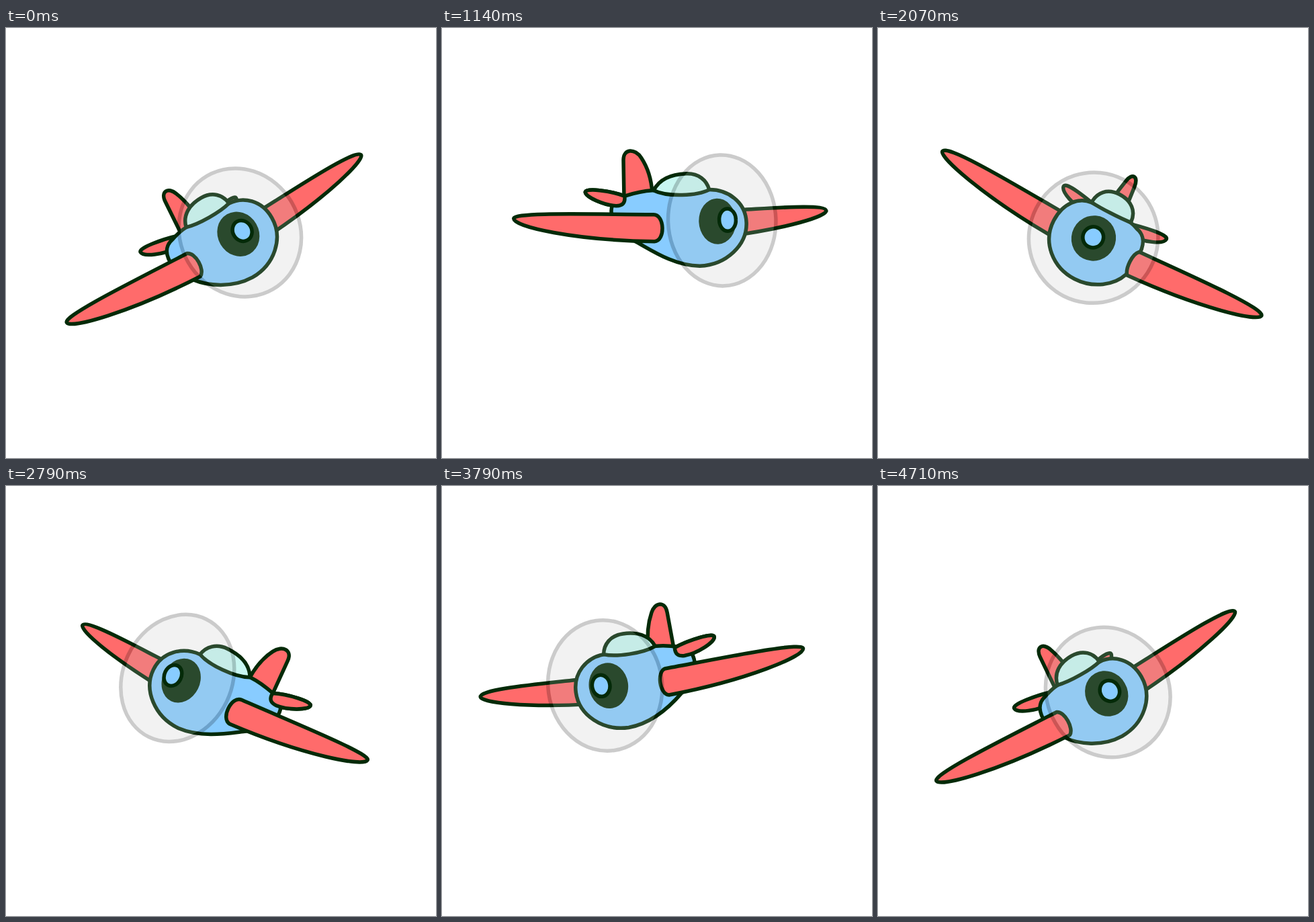
Recreate the animation shown at these times as an HTML page. Size 640 by 640 pixels, loop 4.78 s.

```html
<!DOCTYPE html>
<html>
<head>
<meta charset="utf-8">
<style>
  html, body { margin: 0; height: 100%; overflow: hidden; background: #fff; }
  svg { display: block; width: 100%; height: 100%; }
  path { stroke: #042a08; stroke-width: 5.5; stroke-linejoin: round; }
</style>
</head>
<body>
<svg viewBox="0 0 640 640"><g id="plane"></g></svg>
<script>
const PERIOD = 4780;
const DARK = '#042a08', RED = '#ff6b6b', BLUE = '#88ccff', GLASS = '#c8f7f1';
const plane = document.getElementById('plane');

const ellipse = (cx, cy, rx, ry) =>
  `M${cx - rx} ${cy} a${rx} ${ry} 0 1 0 ${2 * rx} 0 a${rx} ${ry} 0 1 0 ${-2 * rx} 0 Z`;

// Each part has two poses, seen from the front and turned right, with the hub at 0,0.
const parts = [];
function part(fill, front, side) {
  const el = document.createElementNS('http://www.w3.org/2000/svg', 'path');
  el.setAttribute('fill', fill);
  plane.append(el);
  const numbers = side.match(/-?[\d.]+/g).map(Number);
  parts.push({ el, front, numbers });
  return el;
}

// far wing
part(RED,
  'M67 -12 C145 -16 271 -24 269 -10 C269 -1 185 21 67 27 Z',
  'M0 -14 C50 -14 144 -20 144.5 -8 C144 0 90 15 0 24 Z');
// far elevator
part(RED,
  'M20 -41 C50 -48 87 -55 87 -47.5 C87 -38 60 -28 32 -27 C25 -28 20 -31 20 -41 Z',
  'M-110 -38 C-95 -46 -61 -53 -61 -46 C-61 -40 -80 -30 -100 -28 C-105 -28 -110 -31 -110 -38 Z');
// rudder
part(RED,
  'M-13 -38 L-7 -95 C-5 -112 5 -112 7 -97 C9 -86 12 -65 13 -43 Z',
  'M-156 -38 L-155 -94 C-155 -112 -137 -112 -128 -97 C-120 -84 -114 -65 -113.5 -45 Z');
const nearElevator = [
  'M-20 -41 C-50 -48 -87 -55 -87 -47.5 C-87 -38 -60 -28 -32 -27 C-25 -28 -20 -31 -20 -41 Z',
  'M-155 -41 C-175 -50 -213 -56 -213 -49 C-213 -42 -185 -28 -168 -27 C-158 -27 -154 -31 -155 -41 Z'];
part(RED, ...nearElevator);
// body
part(BLUE,
  'M-33 -44.5 C-15 -45 15 -45 31 -44.5 C50 -43 67 -25 67 5 C67 42 36 68 0 68 C-30 68 -55 50 -62 27 ' +
  'C-65 15 -64 -7 -62 -18 C-60 -30 -53 -39 -42 -41 C-38 -43 -36 -44 -33 -44.5 Z',
  'M-112 -48 C-85 -52 -50 -50 -27 -46 C2 -45 27 -25 27 5 C27 38 -5 67 -45 67 C-85 65 -120 38 -140 27 ' +
  'C-162 12 -176 -5 -175 -20 C-174 -33 -166 -39 -155 -41 C-140 -45 -125 -48 -112 -48 Z');
// canopy
part(GLASS,
  'M-33 -45 C-33 -64 -20 -75 0 -75 C20 -75 31 -62 31 -45 C15 -44 -15 -44 -33 -45 Z',
  'M-110 -48 C-100 -66 -80 -71 -60 -71 C-42 -71 -30 -60 -27 -46 C-45 -37 -90 -37 -110 -48 Z');
const elevatorOnTop = part(RED, ...nearElevator);
// nose
part(DARK, ellipse(0, 1, 33.5, 34), ellipse(-15.5, 1.5, 27.5, 34)).style.stroke = 'none';
// near wing
part(RED,
  'M-67 -12 C-145 -16 -274 -24 -272 -11 C-272 -1 -185 21 -67 27 C-61 18 -60 -4 -67 -12 Z',
  'M-111 -12 C-200 -15.5 -321 -24 -319 -13.5 C-319 -2 -232 22 -111 28 C-94 28 -94 -12 -111 -12 Z');
// propeller disc
const disc = part('#c3c3c3', ellipse(0, 0.5, 97.5, 97.5), ellipse(-8.5, 0.5, 79.8, 97.5));
disc.style.stroke = '#000';
disc.style.opacity = 0.2;
// hub
part(BLUE, ellipse(0, 0, 15.6, 15.6), ellipse(0, 0, 12.3, 16.2));

function draw(now) {
  const angle = now % PERIOD / PERIOD * 2 * Math.PI;
  const sin = n => Math.sin(n * angle), cos = n => Math.cos(n * angle);

  const x = 320 + 94.7 * sin(1) + 36 * cos(1) - 7.2 * sin(3) - 4.5 * cos(3);
  const y = 294 + 7 * cos(2) - 17.2 * sin(2) + cos(4);
  const roll = -30 * cos(1);
  const yaw = 0.93 * sin(1) + 0.53 * cos(1) - 0.055 * cos(3);
  const turn = Math.abs(yaw);

  plane.setAttribute('transform',
    `translate(${x} ${y}) rotate(${roll}) scale(${yaw < 0 ? -1 : 1} 1)`);
  for (const { el, front, numbers } of parts) {
    let i = 0;
    // Rounding back to a number keeps the arc flags valid.
    el.setAttribute('d', front.replace(/-?[\d.]+/g,
      n => +(+n + (numbers[i++] - n) * turn).toFixed(2)));
  }
  elevatorOnTop.style.display = turn > 0.6 ? '' : 'none';
}

const start = performance.now();
function tick() {
  draw(performance.now() - start);
  requestAnimationFrame(tick);
}
tick();
</script>
</body>
</html>
```
